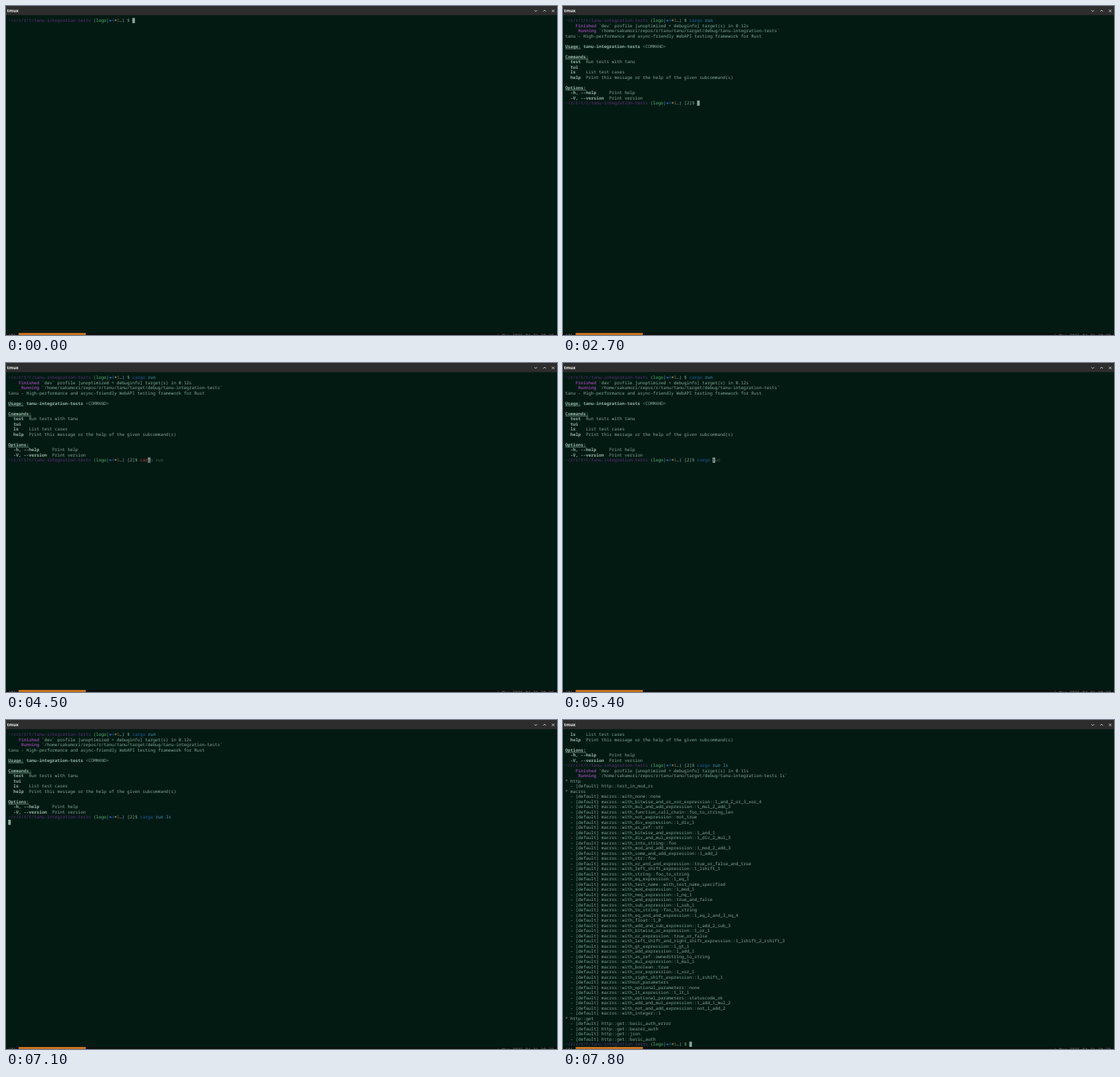
Write an HTML page that moves like this. It is 800 by 478 pixels and loops after 8000 ms.

```html
<!DOCTYPE html>
<html lang="en">
<head>
<meta charset="utf-8">
<title>Terminal session</title>
<style>
  html, body { margin: 0; width: 100%; height: 100%; overflow: hidden; background: #031a13; }
  svg { display: block; width: 800px; height: 478px; }
  text { white-space: pre; text-rendering: geometricPrecision; }
  .cell { font: 6.25px "Noto Sans Mono", "DejaVu Sans Mono", monospace; fill: #86a898; }
  .bold { font-weight: 700; fill: #98b8a8; }
  .head { font-weight: 700; fill: #98b8a8; text-decoration: underline; }
  .path { fill: #60307c; }
  .job { font-weight: 700; fill: #88409c; }
  .branch { fill: #5cb87c; }
  .blue { fill: #2d62bd; }
  .dimblue { fill: #24487c; }
  .plus { font-weight: 700; fill: #c3b48a; }
  .orange { fill: #b8622e; }
  .cmd { fill: #2361a6; }
  .arg { fill: #4698bb; }
  .bad { fill: #cf4540; }
  .ghost { fill: #435e54; }
  .under { fill: #031a13; }
  .status { fill: #85857c; }
  .title { font: 700 6.3px "Open Sans", "Noto Sans", sans-serif; fill: #f2f2f2; }
</style>
</head>
<body>
<svg viewBox="0 0 800 478">
  <rect width="800" height="478" fill="#031a13"/>
  <rect width="800" height="13.3" fill="#2d2d2d"/>
  <text class="title" x="1.5" y="9.1">tmux</text>
  <g fill="none" stroke="#d6d6d6" stroke-width="0.9">
    <path d="M767.2 6.1l2 2 2-2M780 8l2-2 2 2M792.6 5.3l3.6 3.6m0-3.6l-3.6 3.6"/>
  </g>
  <g id="screen"></g>
  <rect y="475" width="800" height="3" fill="#0b100d"/>
  <rect x="18.3" y="475" width="97.6" height="3" fill="#c8711f"/>
  <g id="status"></g>
</svg>
<script>
const LOOP = 8000, COL = 3.755, ROW = 7.5, LEFT = 3.2, TOP = 17.4, ROWS = 61;
const ENTER_1 = 2600, OUTPUT_1 = 2700, ENTER_2 = 7100, OUTPUT_2 = 7200;

const FIRST_KEYS = [100, 200, 300, 400, 500, 700, 1000, 1200, 1300, 1500];
const ERASE_KEYS = [2000, 2100, 2300, 2400];
const SECOND_KEYS = [4300, 4400, 4500, 4700, 4800, 5000, 5500, 5600, 5800, 6000, 6100, 6400];

// A line is a list of [text, class] pieces laid on the character grid.
const plain = text => [[text, ""]];

const prompt = code => [
  ["~/r/r/t/t/tanu-integration-tests", "path"], [" ", ""], ["(logo|", "branch"],
  ["●", "blue"], ["4", "dimblue"], ["+", "plus"], ["1", "orange"],
  ["…) " + code + "$ ", ""]
];

const command = text => {
  const name = text.split(" ")[0];
  return [[name, name === "cargo" ? "cmd" : "bad"], [text.slice(name.length), "arg"]];
};

const build = (seconds, args) => [
  [["    Finished", "job"], [" `dev` profile [unoptimized + debuginfo] target(s) in " + seconds + "s", ""]],
  [["     Running", "job"],
   [" `/home/sakumori/repos/r/tanu/tanu/target/debug/tanu-integration-tests" + args + "`", ""]]
];

const HELP = [
  ...build("0.12", ""),
  plain("tanu - High-performance and async-friendly WebAPI testing framework for Rust"),
  [],
  [["Usage:", "head"], [" ", ""], ["tanu-integration-tests", "bold"], [" <COMMAND>", ""]],
  [],
  [["Commands:", "head"]],
  [["  test", "bold"], ["  Run tests with tanu", ""]],
  [["  tui", "bold"]],
  [["  ls", "bold"], ["    List test cases", ""]],
  [["  help", "bold"], ["  Print this message or the help of the given subcommand(s)", ""]],
  [],
  [["Options:", "head"]],
  [["  -h, --help", "bold"], ["     Print help", ""]],
  [["  -V, --version", "bold"], ["  Print version", ""]]
];

// "~" stands for "_expression::".
const MACROS = `with_none::none
with_bitwise_and_or_xor~1_and_2_or_3_xor_4
with_mul_and_add~1_mul_2_add_3
with_function_call_chain::foo_to_string_len
with_not~not_true
with_div~1_div_1
with_as_ref::str
with_bitwise_and~1_and_1
with_div_and_mul~1_div_2_mul_3
with_into_string::foo
with_mod_and_add~1_mod_2_add_3
with_some_and_add~1_add_2
with_str::foo
with_or_and_and~true_or_false_and_true
with_left_shift~1_lshift_1
with_string::foo_to_string
with_eq~1_eq_1
with_test_name::with_test_name_specified
with_mod~1_mod_1
with_neq~1_nq_1
with_and~true_and_false
with_sub~1_sub_1
with_to_string::foo_to_string
with_eq_and_and~1_eq_2_and_3_nq_4
with_float::1_0
with_add_and_sub~1_add_2_sub_3
with_bitwise_or~1_or_1
with_or~true_or_false
with_left_shift_and_right_shift~1_lshift_2_rshift_3
with_gt~1_gt_1
with_add~1_add_1
with_as_ref::ownedstring_to_string
with_mul~1_mul_1
with_boolean::true
with_xor~1_xor_1
with_right_shift~1_rshift_1
without_parameters
with_optional_parameters::none
with_lt~1_lt_1
with_optional_parameters::statuscode_ok
with_add_and_mul~1_add_1_mul_2
with_not_and_add~not_1_add_2
with_integer::1`.replace(/~/g, "_expression::").split("\n");

const group = (name, tests) => [
  plain("* " + name),
  ...tests.map(test => plain("  - [default] " + name + "::" + test))
];

const LIST = [
  ...build("0.11", " ls"),
  ...group("http", ["test_in_mod_rs"]),
  ...group("macros", MACROS),
  ...group("http::get", ["basic_auth_error", "bearer_auth", "json", "basic_auth"])
];

const pressed = (keys, t) => keys.filter(key => key <= t).length;
const width = line => line.reduce((sum, [text]) => sum + text.length, 0);

function firstInput(t) {
  if (t < 1800) return "cargo run ".slice(0, pressed(FIRST_KEYS, t));
  return "cargo run test".slice(0, 14 - pressed(ERASE_KEYS, t));
}

function suggest(typed, full) {
  return typed && full.startsWith(typed) ? full.slice(typed.length) : "";
}

// Lines on the terminal, plus the text that follows the cursor position.
function session(t) {
  const lines = [];
  const edit = (code, typed, full) => {
    lines.push([...prompt(code), ...command(typed)]);
    return { lines, ghost: suggest(typed, full) };
  };
  const waiting = () => {
    lines.push([]);
    return { lines, ghost: "" };
  };

  if (t < ENTER_1) return edit("", firstInput(t), t < 1800 ? "cargo run test" : "");
  lines.push([...prompt(""), ...command("cargo run")]);
  if (t < OUTPUT_1) return waiting();
  lines.push(...HELP);

  const typed = "cargo run ls".slice(0, pressed(SECOND_KEYS, t));
  if (t < ENTER_2) return edit("[2]", typed, "cargo run");
  lines.push([...prompt("[2]"), ...command(typed)]);
  if (t < OUTPUT_2) return waiting();
  lines.push(...LIST);
  return edit("", "", "");
}

const escape = text => text.replace(/&/g, "&amp;").replace(/</g, "&lt;");

function cell(text, cls, col, row) {
  const pad = text.length - text.trimStart().length;
  const body = text.trim();
  if (!body) return "";
  const x = (LEFT + (col + pad) * COL).toFixed(2);
  const y = (TOP + row * ROW + 5.9).toFixed(2);
  return `<text class="cell ${cls}" x="${x}" y="${y}">${escape(body)}</text>`;
}

function drawLine(line, row) {
  let col = 0, out = "";
  for (const [text, cls] of line) {
    out += cell(text, cls, col, row);
    col += text.length;
  }
  return out;
}

function drawScreen(t) {
  const { lines, ghost } = session(t);
  const visible = lines.slice(-ROWS);
  const row = visible.length - 1, col = width(visible[row]);
  const x = LEFT + col * COL, y = TOP + row * ROW;
  return visible.map(drawLine).join("")
    + `<rect x="${x}" y="${y}" width="${COL}" height="${ROW}" fill="#87a999"/>`
    + cell(ghost.slice(0, 1), "under", col, row)
    + cell(ghost.slice(1), "ghost", col + 1, row);
}

const screen = document.getElementById("screen");
document.getElementById("status").innerHTML =
  cell("[0]", "status", 0, ROWS) + cell("| Mon 2025-04-21 20:38", "status", 189, ROWS);

let shown = -1;
function update(now) {
  const tick = Math.floor(now % LOOP / 100);
  if (tick !== shown) {
    shown = tick;
    screen.innerHTML = drawScreen(tick * 100);
  }
  requestAnimationFrame(update);
}
update(0);
</script>
</body>
</html>
```
